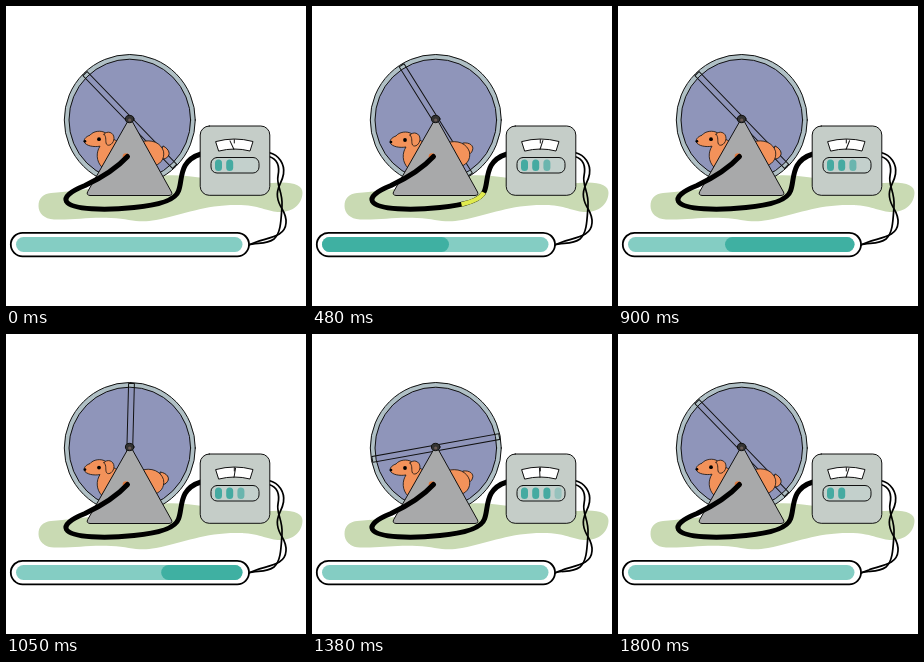
Animation of 300x300 px, one loop 1830 ms. Source, as an HTML page:

```html
<!DOCTYPE html>
<html lang="en">
<head>
<meta charset="utf-8">
<title>Hamster power</title>
<style>
  html, body { margin: 0; width: 100%; height: 100%; overflow: hidden; background: #fff; }
  svg { display: block; width: 100vw; height: 100vh; }
  .ink { stroke: #111; stroke-width: 1; stroke-linejoin: round; stroke-linecap: round; }
  .line { fill: none; }
  .fur { fill: #f3925a; stroke-width: .8; }
</style>
</head>
<body>
<svg viewBox="0 0 300 300">
  <path fill="#c9dab3" d="M45 187C62 186 70 184 84 183C110 181 135 171 160 169.500C190 168 225 180 266 177C286 175 297 179 296.500 187
    C296 199 286 206 274 206C262 206 256 200 235 199C200 198 180 208 150 214C132 217.500 125 213 105 212
    C82 211 70 214 48 213.500C38 213 32.500 207 32.500 200C32.500 192 37 188 45 187Z"/>

  <!-- wheel -->
  <circle class="ink" cx="123.800" cy="114" r="65.500" fill="#b0c0c5"/>
  <circle class="ink" cx="123.800" cy="114" r="60.800" fill="#8f95ba"/>
  <g id="bar"><rect class="ink line" x="-64.500" y="-2.900" width="129" height="5.800"/></g>

  <!-- hamster -->
  <g id="hamster">
    <path id="tail" class="ink fur" d="M151 137C158 136 162 140 160.500 144C160 147 157 149 154 149Z"/>
    <path class="ink fur" d="M134 137C146 133 155 138 157.500 146C159 154 154 160 146 161L96 162
      C90 156 90 147 94 141C88 142 80 141 78 136.500C78 133 81 131 84 130C87 126 95 124.500 100 128C106 132 108 140 134 137Z"/>
    <path class="ink fur" d="M98 129C101 125 108 127 108 133C108 138 103 142 100.500 139C99 136 101 132 98 129Z"/>
    <circle cx="93" cy="134" r="1.900"/>
    <circle cx="79" cy="136" r="1.300"/>
  </g>

  <!-- stand -->
  <path class="ink" fill="#a8a9aa" d="M122 115Q124 112 126 115L165.500 186Q167 189 163 189.500H84Q80 189 81.500 186Z"/>
  <ellipse class="ink" cx="123.700" cy="113" rx="4.300" ry="3.700" fill="#333"/>
  <circle cx="123.700" cy="114" r="1.600" fill="#6b5a55"/>
  <circle cx="120" cy="150.500" r="3.300" fill="#e2783c"/>

  <!-- thick cable -->
  <defs>
    <path id="lead" d="M121.500 150.500C111 162 97 171 79 179.500C64 185.500 58 191 60.500 195.500C66 204 100 204.500 128 201.500C150 199.500 169 195 172.500 185C177 174 172 155 195 148"/>
  </defs>
  <g class="line" stroke-linecap="round">
    <use href="#lead" stroke="#000" stroke-width="5"/>
    <use id="spark" href="#lead" stroke="#dfea4e" stroke-width="4.400" stroke-linecap="butt"/>
  </g>

  <!-- thin cables -->
  <g class="line" stroke="#000" stroke-width="1.700">
    <path d="M263 146.500C273 149 279 158 277.500 168C276 178 270 181 271.500 191C273 203 281 205 280 217C279 233 258 231 242 239.500"/>
    <path d="M263 150.500C271 153 274 160 272 170C270 179 277 186 276 200C275 214 275 227 268 233C260 239 250 236 242 239"/>
  </g>

  <!-- meter -->
  <rect class="ink" x="194.200" y="120" width="69.600" height="69.300" rx="9" fill="#c5cdc8"/>
  <path class="ink" fill="#fff" stroke-width=".8" d="M210 135.500Q228.500 130.500 247 135.500L244 145Q228.500 141 213 145Z"/>
  <path class="ink" d="M228.300 133.500V137"/>
  <path id="needle" class="ink" d="M0 0V-9.500"/>
  <rect class="ink" x="205" y="151.500" width="48" height="15.500" rx="6" fill="#c3d0cc"/>
  <g id="leds"></g>

  <!-- tube -->
  <rect x="4.800" y="226.800" width="238.200" height="23.500" rx="11.750" fill="#fff" stroke="#000" stroke-width="1.800"/>
  <rect x="10" y="231" width="226.500" height="15" rx="7.500" fill="#84cdc3"/>
  <rect id="charge" y="231" height="15" rx="7.500" fill="#3fb0a2"/>
</svg>
<script>
const LOOP = 1830, STEP = 30, SPARK = 26;
const el = id => document.getElementById(id);
const set = (node, attrs) => {
  for (const key in attrs) node.setAttribute(key, attrs[key]);
};

// Linear interpolation through [time, value] points
function track(points, t) {
  const i = points.findIndex(p => p[0] > t);
  if (i < 0) return points[points.length - 1][1];
  if (i === 0) return points[0][1];
  const [t0, v0] = points[i - 1], [t1, v1] = points[i];
  return v0 + (v1 - v0) * (t - t0) / (t1 - t0);
}

const front = [[0, 0], [210, 63], [480, 127], [890, 226.5]];
const rear = [[600, 0], [900, 97], [1230, 203], [1310, 226.5]];
const swing = [[0, -25], [210, -25], [480, 18], [900, 22], [1230, -6], [1530, 0], [1800, 18]];
const power = [[0, 2], [210, 2.7], [1230, 2.7], [1530, 4], [1680, 4], [1800, 2]];

const leds = [0, 1, 2, 3].map(i => {
  const led = document.createElementNS('http://www.w3.org/2000/svg', 'rect');
  set(led, { x: 209 + i * 11.2, y: 153.5, width: 7, height: 11.5, rx: 3.5, fill: '#45aaa1' });
  return el('leds').appendChild(led);
});

// One full turn at constant speed, then half a turn slowing down
function wheelAngle(t) {
  if (t < 900) return 46 + t * 0.4;
  const s = (t - 900) / 900;
  return 46 + 180 * (s + 0.62 * s * (1 - s));
}

function draw(t) {
  set(el('bar'), { transform: `translate(123.800 114) rotate(${wheelAngle(t)})` });

  const wave = Math.abs(Math.sin(t / 900 * Math.PI));
  set(el('hamster'), { transform: `translate(0 ${0.8 * wave - 0.8})` });
  set(el('tail'), { transform: `rotate(${35 * (1 - wave)} 148 149)` });

  const start = t * 0.39 - 5 - SPARK / 2;
  const from = Math.max(0, start), length = Math.max(0, start + SPARK - from);
  set(el('spark'), {
    'stroke-dasharray': `0 ${from} ${length} 999`,
    visibility: t > 0 && t < 660 ? 'visible' : 'hidden'
  });

  set(el('needle'), { transform: `translate(228 143.500) rotate(${track(swing, t)})` });
  const level = track(power, t);
  leds.forEach((led, i) => set(led, { opacity: Math.min(1, Math.max(0, level - i)) }));

  const left = track(rear, t);
  set(el('charge'), { x: 10 + left, width: Math.max(0, track(front, t) - left) });
}

function tick() {
  draw(Math.floor(performance.now() % LOOP / STEP) * STEP);
  requestAnimationFrame(tick);
}
tick();
</script>
</body>
</html>
```
